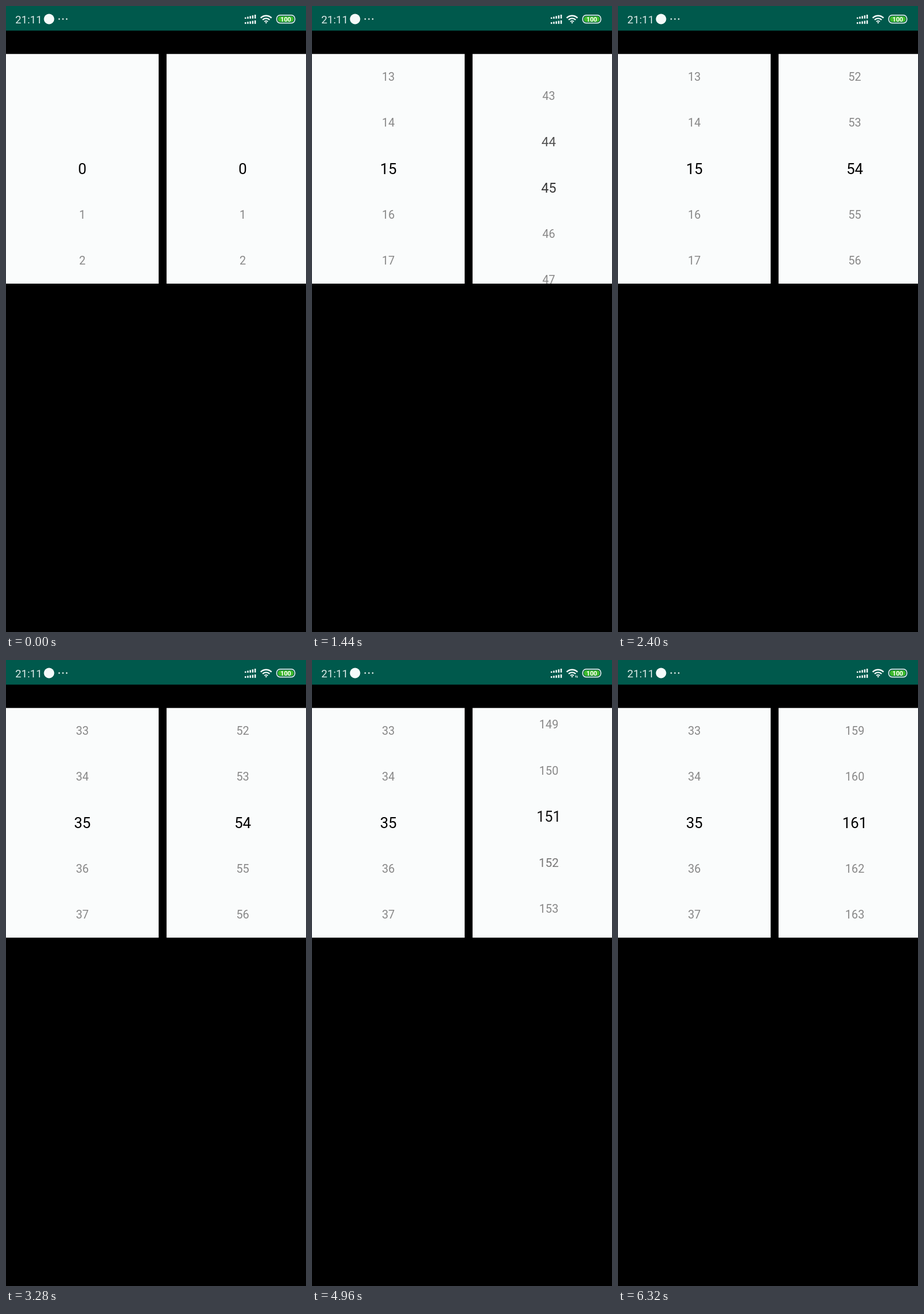
These frames come from a looping animation (519 by 1080 pixels, 6400 ms). An HTML page:

```html
<!DOCTYPE html>
<html lang="en">
<head>
<meta charset="utf-8">
<title>Number wheels</title>
<style>
  html, body { margin: 0; width: 100%; height: 100%; overflow: hidden; background: #000; }
  svg { display: block; font-family: Roboto, sans-serif; }
  .wheel text { text-anchor: middle; }
</style>
</head>
<body>
<svg width="100%" height="100%" viewBox="0 0 519 1080">
  <rect width="519" height="1080"/>
  <rect width="519" height="42.5" fill="#00594c"/>

  <g fill="#f4faf9">
    <text x="16" y="30" font-size="18.7" fill="#dceae8">21:11</text>
    <circle cx="74.5" cy="22.5" r="9"/>
    <circle cx="92" cy="22.5" r="1.3"/>
    <circle cx="98.5" cy="22.5" r="1.3"/>
    <circle cx="105" cy="22.5" r="1.3"/>
    <g id="signal"></g>
    <g fill="none" stroke="#f4faf9" stroke-width="2.4">
      <path d="M440.6 20.6a13.3 13.3 0 0 1 18.8 0"/>
      <path d="M443.9 23.9a8.6 8.6 0 0 1 12.2 0"/>
      <path d="M447 27a4.3 4.3 0 0 1 6 0" stroke-width="2"/>
    </g>
    <circle cx="450" cy="28.8" r="1.3"/>
    <path id="traffic" d="M455 28.2l1.3-2 1.3 2h-.8v2h-1v-2zM457.6 29l1.2 2 1.2-2h-.7v-2h-1v2z"/>
    <rect x="468.3" y="15.8" width="31.4" height="13.6" rx="6" fill="none" stroke="#f4faf9" stroke-width="1.5"/>
    <rect x="470.3" y="17.8" width="27.4" height="9.6" rx="4.2" fill="#3db92b"/>
    <text x="484" y="26.6" font-size="10.8" font-weight="700" text-anchor="middle" fill="#fff">100</text>
  </g>

  <svg class="wheel" id="left" x="0" y="82.5" width="264.3" height="396.5"></svg>
  <svg class="wheel" id="right" x="277.5" y="82.5" width="264.3" height="396.5"></svg>
</svg>
<script>
const LOOP = 6400, STEP = 80;
const PITCH = 79.3, MIDDLE = 198.2, SIZE = 19.8;

const $ = id => document.getElementById(id);

function add(parent, tag, attrs) {
  const el = document.createElementNS('http://www.w3.org/2000/svg', tag);
  return parent.appendChild(set(el, attrs));
}

function set(el, attrs) {
  for (const key in attrs) el.setAttribute(key, attrs[key]);
  return el;
}

// Two rows of rising signal bars
for (let i = 0; i < 5; i++) {
  const x = 413 + i * 4.2, upper = 2.4 + i * 1.05, lower = 2.8 + i * 0.8;
  add($('signal'), 'rect', { x, y: 22 - upper - i * 0.1, width: 2.5, height: upper });
  add($('signal'), 'rect', { x, y: 30.8 - lower, width: 2.5, height: lower });
}

// Flings: [start ms, end ms, distance in items, deceleration power]
function makeWheel(id, flings) {
  const root = $(id);
  add(root, 'rect', { width: '100%', height: '100%', fill: '#fafcfc' });
  const labels = Array.from({ length: 7 }, () => add(root, 'text', { x: 132.1 }));
  return { labels, flings };
}

const wheels = [
  makeWheel('left', [[480, 1200, 15, 2.45], [2560, 3280, 20, 2.45]]),
  makeWheel('right', [[480, 2400, 54, 2.52], [3360, 5920, 107, 2.43]])
];

function position(flings, t) {
  return flings.reduce((sum, [start, end, distance, power]) => {
    const u = Math.min(1, Math.max(0, (t - start) / (end - start)));
    return sum + distance * (1 - (1 - u) ** power);
  }, 0);
}

function drawWheel({ labels, flings }, t) {
  const pos = position(flings, t), first = Math.round(pos) - 3;
  labels.forEach((label, i) => {
    const n = first + i, away = Math.min(1, Math.abs(n - pos));
    const size = SIZE * (1.3 - 0.3 * away), shade = Math.round(136 * away);
    label.textContent = n < 0 ? '' : n;
    set(label, {
      y: MIDDLE + (n - pos) * PITCH + size * 0.342,
      'font-size': size,
      fill: `rgb(${shade},${shade},${shade})`
    });
  });
}

function draw(now) {
  const t = Math.floor(now % LOOP / STEP) * STEP;
  wheels.forEach(wheel => drawWheel(wheel, t));
  $('traffic').style.display = t >= 4560 && t < 6320 ? '' : 'none';
  requestAnimationFrame(draw);
}

draw(performance.now());
</script>
</body>
</html>
```
